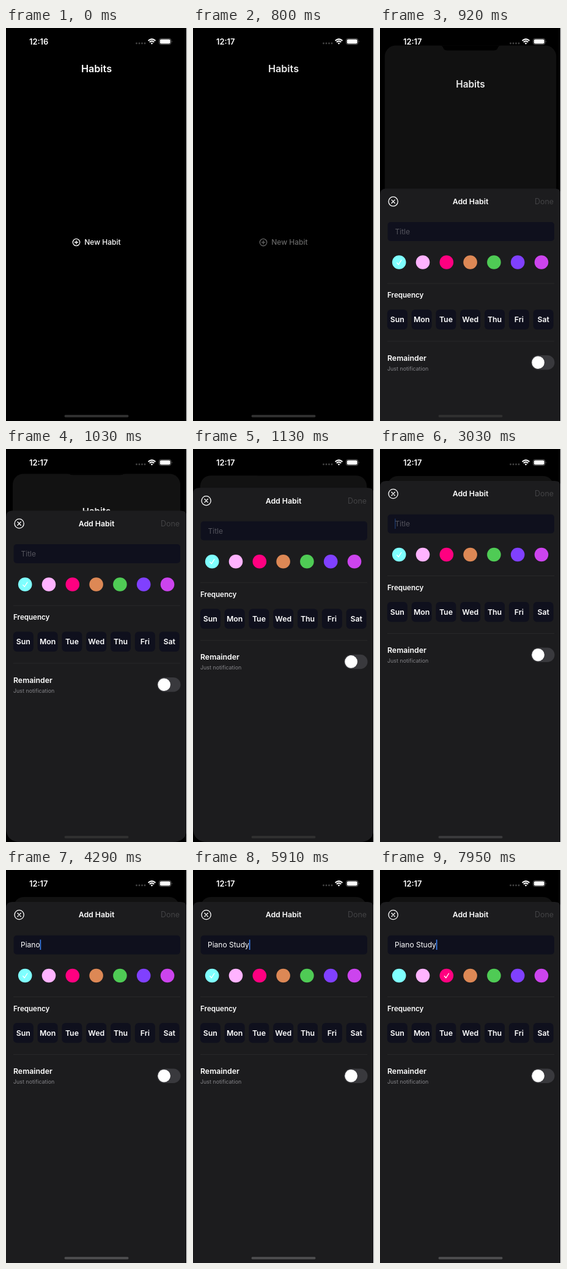
Recreate the animation shown at these times as an HTML page. Size 296 by 640 pixels, loop 8 s.

```html
<!DOCTYPE html>
<html lang="en">
<head>
<meta charset="utf-8">
<title>Habits</title>
<style>
  html, body { margin: 0; width: 100%; height: 100%; overflow: hidden; background: #000; }
  svg { display: block; width: 100%; height: 100%; }
  text { font-family: Inter, sans-serif; fill: #fff; white-space: pre; }
  .line { fill: none; stroke: #fff; stroke-width: 1.3; stroke-linecap: round; stroke-linejoin: round; }
  .bold { font-weight: 600; font-size: 12.3px; }
  .mid { text-anchor: middle; }
  .field { fill: #0f101d; }
  .rule { stroke: #2b2b2d; stroke-width: .8; }
</style>
</head>
<body>
<svg viewBox="0 0 296 640">
  <rect width="296" height="640"/>

  <g id="page">
    <rect id="card" width="296" height="640" rx="19" fill="#fff"/>
    <path id="notch"/>
    <text id="heading" class="mid" x="148" y="72" font-size="16.2" font-weight="600">Habits</text>
    <g id="newHabit">
      <circle class="line" cx="115" cy="349" r="5.7"/>
      <path class="line" d="M112.3 349h5.4M115 346.3v5.4"/>
      <text x="128.3" y="353.2" font-size="12" font-weight="500">New Habit</text>
    </g>
  </g>

  <g id="sheet">
    <path id="panel" fill="#1c1c1e"/>
    <circle class="line" cx="21.6" cy="73" r="7.6"/>
    <path class="line" d="M18.9 70.3l5.4 5.4m0-5.4l-5.4 5.4"/>
    <text class="bold mid" x="148" y="77.4">Add Habit</text>
    <text x="284" y="77.4" font-size="12.4" text-anchor="end" style="fill:#434345">Done</text>

    <rect class="field" x="12.5" y="106.5" width="272.5" height="31" rx="5"/>
    <text id="placeholder" x="24.5" y="126.4" font-size="12" style="fill:#55555d">Title</text>
    <text id="typed" x="24" y="126.4" font-size="12"></text>
    <rect id="caret" y="113.5" width="1.6" height="16.5" fill="#3b82f0"/>

    <g id="swatches"></g>
    <path class="rule" d="M12 206.5h273M12 300.5h273"/>
    <text class="bold" x="12" y="229.6" style="font-size:11.6px">Frequency</text>
    <g id="days"></g>

    <text class="bold" x="12" y="332">Remainder</text>
    <text x="12" y="348.2" font-size="8.9" style="fill:#858589">Just notification</text>
    <rect x="247" y="323.5" width="38.5" height="23.5" rx="11.75" fill="#39393d"/>
    <circle cx="258.6" cy="335.2" r="10.3" fill="#fff"/>
  </g>

  <g id="status">
    <text id="clock" x="38" y="26.6" font-size="12.9" font-weight="600"></text>
    <path d="M213.5 25h14" stroke="#454545" stroke-width="2.8" stroke-linecap="round" stroke-dasharray="0 4.5"/>
    <path d="M232.6 20.8q5.9-5.4 11.8 0M234.8 23q3.7-3.2 7.4 0" fill="none" stroke="#fff" stroke-width="2"/>
    <path d="M236.6 24.8q1.9-1.5 3.8 0l-1.9 2z" fill="#fff"/>
    <rect x="250.5" y="17.3" width="19.4" height="9.4" rx="3" fill="none" stroke="#6b6b6b" stroke-width=".9"/>
    <rect x="251.8" y="18.6" width="16.8" height="6.8" rx="1.9" fill="#fff"/>
    <path d="M271 20.5q1.5 1.5 0 3z" fill="#6b6b6b"/>
  </g>
  <rect id="homeBar" x="95.5" y="630" width="105" height="4" rx="2"/>
  <rect x="295" width="1" height="640" fill="#fff"/>
</svg>

<script>
const LOOP = 8000;
const TITLE = "Piano Study";
const COLORS = ["#7fffff", "#ffb3ff", "#ff0080", "#dd8855", "#4fcb55", "#8040ff", "#cc44ee"];
const DAYS = ["Sun", "Mon", "Tue", "Wed", "Thu", "Fri", "Sat"];
const SHEET_STEPS = [800, 920, 1030, 1130, 1240, 1350];
const CHECK_STEPS = [7600, 7720, 7830, 7950];
// [time, number of letters typed]
const KEYS = [[3150, 1], [3260, 2], [3420, 3], [3630, 4], [3790, 5],
  [4520, 6], [5350, 8], [5580, 9], [5760, 10], [5910, 11]];

const $ = id => document.getElementById(id);
const set = (id, attrs) => {
  for (const name in attrs) $(id).setAttribute(name, attrs[name]);
};

$("swatches").innerHTML = COLORS.map((color, i) => {
  const x = 31.2 + 38.8 * i;
  return `<circle cx="${x}" cy="172" r="11.3" fill="${color}"/>
    <path id="check${i}" class="line" opacity="0" d="M${x - 3.5} 172.8l2.6 2.9 4.6-7.2"/>`;
}).join("");

$("days").innerHTML = DAYS.map((day, i) => {
  const x = 28.3 + 39.8 * i;
  return `<rect class="field" x="${x - 16.5}" y="249" width="33" height="32.5" rx="6"/>
    <text class="bold mid" x="${x}" y="269.8">${day}</text>`;
}).join("");

// Critically damped spring from 0 to 1, sampled at the screen's refresh steps.
function sheetProgress(t) {
  if (t < SHEET_STEPS[0]) return 0;
  if (t >= SHEET_STEPS.at(-1)) return 1;
  const x = 17.6 * (SHEET_STEPS.findLast(s => s <= t) - 795) / 1000;
  return 1 - (1 + x) * Math.exp(-x);
}

function caretOpacity(t) {
  if (t < 3030) return 0;
  if (t < 3150) return .3;
  if (t < 7030 || t >= 7380) return 1;
  return t < 7270 ? 0 : .5;
}

function drawPage(t, p) {
  const scale = 1 - .081 * p;
  set("page", { transform: `translate(${148 * (1 - scale)} ${44 * p}) scale(${scale})` });
  set("card", { "fill-opacity": .07 * Math.min(1, 1.5 * p) });
  const h = 12 * (1 - p);
  set("notch", { d: `M94 0q6 0 7 ${h}q1 ${h} 7 ${h}h80q6 0 7-${h}q1-${h} 7-${h}z` });
  set("heading", { opacity: t < 800 ? 1 : .92 });
  set("newHabit", { opacity: t < 500 ? 1 : t < 800 ? .46 : .4 });
}

function drawSheet(t, p) {
  const drop = 591 * (1 - p);
  set("sheet", { transform: `translate(0 ${drop})` });
  const bottom = 640 - drop;
  const r = t >= 1030 && t < 2130 ? 24 : 0;
  set("panel", {
    d: `M0 62q0-10 10-10h276q10 0 10 10V${bottom - r}q0 ${r}-${r} ${r}H${r}q-${r} 0-${r}-${r}z`
  });

  const key = KEYS.findLast(([time]) => time <= t);
  const text = TITLE.slice(0, key ? key[1] : 0);
  $("typed").textContent = text;
  set("placeholder", { opacity: text ? 0 : 1 });
  const width = text ? $("typed").getComputedTextLength() : 0;
  set("caret", { x: 24 + width, opacity: caretOpacity(t) });

  const switched = CHECK_STEPS.filter(s => s <= t).length / CHECK_STEPS.length;
  set("check0", { opacity: 1 - switched });
  set("check2", { opacity: switched });
}

function draw(t) {
  const p = sheetProgress(t);
  drawPage(t, p);
  drawSheet(t, p);
  $("clock").textContent = t < 500 ? "12:16" : "12:17";
  set("homeBar", { fill: t < 2130 ? "#303030" : t < 4290 ? "#3a3a3c" : "#4c4c4e" });
}

function tick() {
  draw(performance.now() % LOOP);
  requestAnimationFrame(tick);
}
tick();
</script>
</body>
</html>
```
